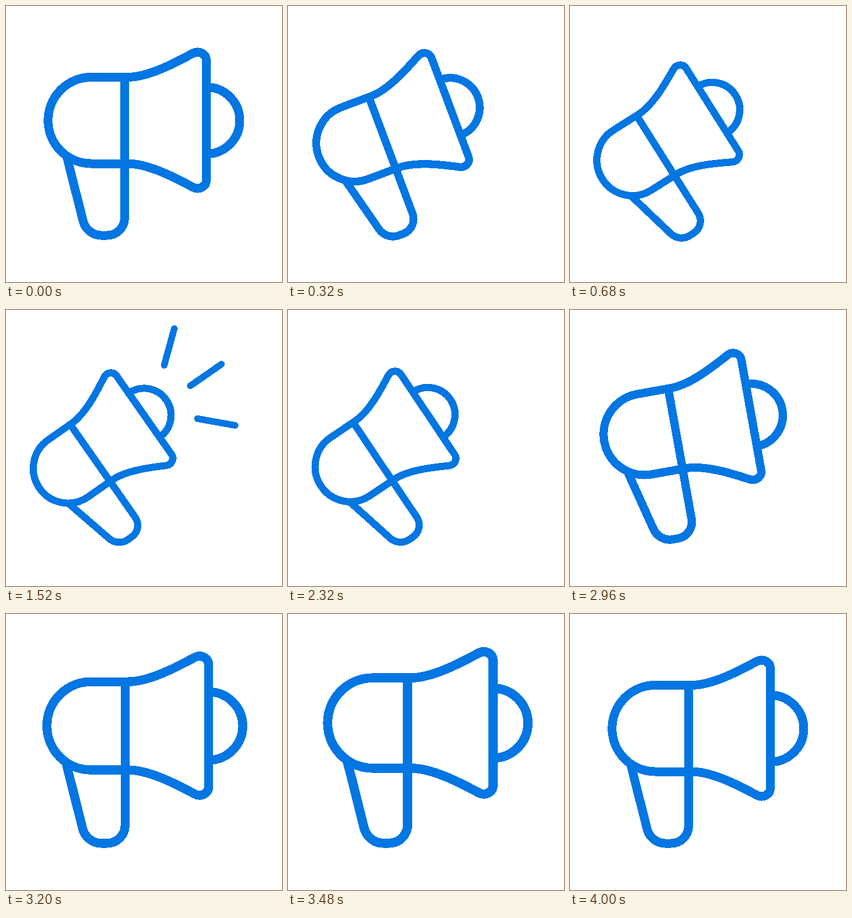
Write an HTML page that moves like this. It is 500x500 px and loops after 4.04 s.

```html
<!DOCTYPE html>
<html lang="en">
<head>
<meta charset="utf-8">
<title>Megaphone</title>
<style>
  html, body { margin: 0; width: 100%; height: 100%; overflow: hidden; background: #fff; }
  svg { display: block; width: 100vw; height: 100vh; fill: none; stroke: #0276e2; shape-rendering: crispEdges; }
  #horn { stroke-width: 16; }
  #rays { stroke-width: 12; stroke-linecap: round; }
</style>
</head>
<body>
<svg viewBox="0 0 500 500">
  <g id="horn">
    <path d="M154.5 129H220C256 129 301 106 339 85.5C350 80 363 87 363 99V315
      C363 327 350 334 339 328.5C301 308 256 285.5 220 285.5H154.5A78.25 78.25 0 0 1 154.5 129Z"/>
    <path d="M215 129V383C215 401 201 415.5 183 415.5H172C157 415.5 143 404 139.5 389L110.5 274"/>
    <path d="M363 147A60.5 60.5 0 0 1 363 268"/>
  </g>
  <g id="rays"><path/><path/><path/></g>
</svg>
<script>
const LOOP = 4040, STEP = 40, SWING = 1040;
const PIVOT = [176.5, 423.5];
// Each ray: inner x, inner y, outer x, outer y
const RAYS = [
  [282, 117, 307.5, 24],
  [319.5, 147.4, 398.5, 92.5],
  [329.5, 193.8, 424.8, 210.7]
];
const horn = document.getElementById('horn');
const rayPaths = document.querySelectorAll('#rays path');

const clamp = v => Math.min(1, Math.max(0, v));
const part = (t, from, to) => clamp((t - from) / (to - from));
const bezier = (a, b, s) => 3 * (1 - s) ** 2 * s * a + 3 * (1 - s) * s * s * b + s ** 3;

// Fast start, long soft landing
function ease(x) {
  if (x <= 0 || x >= 1) return clamp(x);
  let lo = 0, hi = 1;
  for (let i = 0; i < 24; i++) {
    const mid = (lo + hi) / 2;
    if (bezier(0.167, 0.28, mid) < x) lo = mid; else hi = mid;
  }
  return bezier(0.167, 1, lo);
}

// Two beats after the swing back
function pulse(t) {
  return t < 3600
    ? Math.min(part(t, 3120, 3400), 1 - part(t, 3400, 3600))
    : Math.min(part(t, 3600, 3800), 1 - part(t, 3800, 4000));
}

function draw(t) {
  const tilt = ease(Math.min(t, 3 * SWING - t) / SWING);
  const scale = 1 - 0.194 * tilt + 0.075 * pulse(t);
  const [x, y] = PIVOT;
  horn.setAttribute('transform',
    `translate(${x + 50.5 * tilt} ${y - 4 * tilt}) rotate(${-35 * tilt}) scale(${scale}) translate(${-x} ${-y})`);

  const head = 1 - (1 - part(t, 1112, 1880)) ** 3;
  const tail = part(t, 1440, 1880);
  RAYS.forEach(([x1, y1, x2, y2], i) => {
    const at = k => `${x1 + (x2 - x1) * k} ${y1 + (y2 - y1) * k}`;
    rayPaths[i].setAttribute('d', head > tail ? `M${at(tail)}L${at(head)}` : '');
  });
}

const start = performance.now();
function tick() {
  const t = (performance.now() - start) % LOOP;
  draw(Math.floor(t / STEP) * STEP);
  requestAnimationFrame(tick);
}
tick();
</script>
</body>
</html>
```
